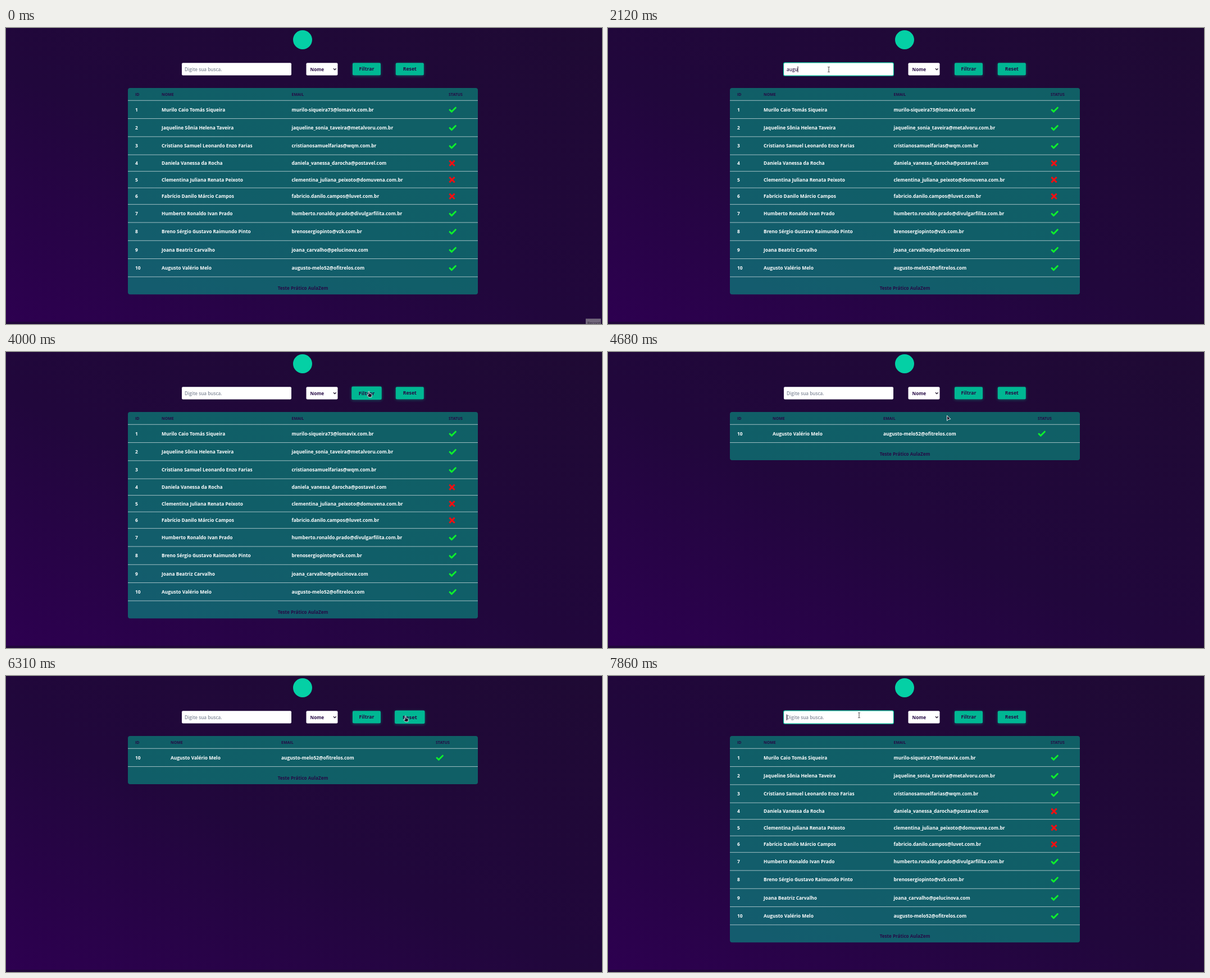
An HTML page that plays this animation: 1061 by 528 pixels, repeating every 8 s.

```html
<!DOCTYPE html>
<html lang="pt-BR">
<head>
<meta charset="utf-8">
<title>Teste Prático</title>
<style>
  html, body { margin: 0; width: 100%; height: 100%; overflow: hidden; background: #20083a; }
  svg {
    display: block; width: 1061px; height: 528px;
    background: linear-gradient(24deg, #2d0050 0%, #21073c 45%, #1f0a34 100%) 0 0 / 100% 524px;
    font: 700 8.4px "Open Sans", "Noto Sans", sans-serif;
  }
  text { white-space: pre; }
  .panel { fill: rgba(0, 181, 148, .5); }
  .line { fill: #fff; opacity: .6; }
  .cell { fill: #fff; }
  .head { fill: #260a45; font-size: 7px; }
  .foot { fill: #260a45; font-size: 8.1px; text-anchor: middle; }
  .yes, .no { fill: none; stroke: #0df22c; stroke-width: 2.9; stroke-linejoin: round; stroke-linecap: round; }
  .no { stroke: #f30f12; stroke-width: 3.1; stroke-linecap: square; }
  .btn rect { fill: #00b793; filter: drop-shadow(0 1.5px 2.5px rgba(0, 183, 147, .45)); }
  .btn text { fill: #260a45; font-size: 8.7px; text-anchor: middle; }
  .field { font-size: 8.2px; font-weight: 600; }
</style>
</head>
<body>
<svg viewBox="0 0 1061 528">
  <circle cx="528" cy="21" r="17" fill="#04d0a5"/>

  <rect x="313" y="62.3" width="195" height="22.2" rx="2" fill="#fff"/>
  <rect id="ring" x="312.5" y="61.8" width="196" height="23.4" rx="2.5" fill="#fff" stroke="#00b793" stroke-width="1.2"/>
  <text id="hint" class="field" x="318" y="77" fill="#828a99">Digite sua busca.</text>
  <text id="typed" class="field" x="318" y="77" fill="#3a2552"></text>
  <rect id="caret" y="68.5" width="1" height="10.5" fill="#1c1028"/>

  <rect x="534.5" y="62.3" width="56" height="22.2" rx="2" fill="#fff"/>
  <text x="541.5" y="77" font-size="8.2" fill="#260a45">Nome</text>
  <path d="M583 72.2l2.3 2.4 2.3-2.4" fill="none" stroke="#1c1028" stroke-width="1.3"/>

  <g id="filter" class="btn">
    <rect x="-25" y="-11" width="50" height="22" rx="2"/><text y="3">Filtrar</text>
  </g>
  <g id="reset" class="btn">
    <rect x="-25" y="-11" width="50" height="22" rx="2"/><text y="3">Reset</text>
  </g>

  <g id="full"></g>
  <g id="found"></g>

  <g id="tip">
    <rect x="1032" y="518.5" width="27" height="10" fill="#72687c"/>
    <text x="1035" y="528.5" font-size="7" font-weight="400" fill="#2b2433">Record</text>
  </g>

  <g id="cursor">
    <path id="arrow" d="M.5.5V9.8L2.9 7.5 6.7 6.8Z" fill="#1a1028" stroke="#fff" stroke-width=".9" stroke-linejoin="round"/>
    <path id="hand" d="M-.9.6Q0-.5.9.6V4L4.6 4.9Q5.4 5.2 5.3 6.2L4.7 10.6H-.3L-3 7Q-3.1 5.8-2 6L-.9 7Z"
      fill="#1a1028" stroke="#fff" stroke-width=".8" stroke-linejoin="round"/>
    <path id="beam" d="M-1.8-4.5H-.5L0-4 .5-4.5H1.8M0-4V4M-1.8 4.5H-.5L0 4 .5 4.5H1.8" fill="none" stroke="#333" stroke-width=".9"/>
  </g>
</svg>

<script>
const LOOP = 8000;
const el = id => document.getElementById(id);

const people = [
  ["Murilo Caio Tomás Siqueira", "murilo-siqueira73@lomavix.com.br", 1],
  ["Jaqueline Sônia Helena Taveira", "jaqueline_sonia_taveira@metalvoru.com.br", 1],
  ["Cristiano Samuel Leonardo Enzo Farias", "cristianosamuelfarias@wqm.com.br", 1],
  ["Daniela Vanessa da Rocha", "daniela_vanessa_darocha@postavel.com", 0],
  ["Clementina Juliana Renata Peixoto", "clementina_juliana_peixoto@domuvena.com.br", 0],
  ["Fabrício Danilo Márcio Campos", "fabricio.danilo.campos@luvet.com.br", 0],
  ["Humberto Ronaldo Ivan Prado", "humberto.ronaldo.prado@divulgarfilita.com.br", 1],
  ["Breno Sérgio Gustavo Raimundo Pinto", "brenosergiopinto@vzk.com.br", 1],
  ["Joana Beatriz Carvalho", "joana_carvalho@pelucinova.com", 1],
  ["Augusto Valério Melo", "augusto-melo52@ofitrelos.com", 1]
].map(([name, mail, ok], i) => ({ id: i + 1, name, mail, ok }));

function table(rows, cols) {
  const text = (cls, x, y, s) => `<text class="${cls}" x="${x}" y="${y}">${s}</text>`;
  const line = y => `<rect class="line" x="217" y="${y - .25}" width="623" height="1"/>`;
  let y = 129;
  let out = ["ID", "NOME", "EMAIL", "STATUS"].map((s, i) => text("head", cols[i], 120.7, s)).join("") + line(y);
  for (const p of rows) {
    const h = p.ok ? 32.3 : 29.5, mid = y + h / 2 + .6;
    out += [p.id, p.name, p.mail].map((s, i) => text("cell", cols[i], mid + 3, s)).join("");
    out += `<path class="${p.ok ? "yes" : "no"}" transform="translate(${cols[3]} ${mid})" d="${
      p.ok ? "M2 .2L5.3 3.6 12.4-3.6" : "M2.5-3.5L9.5 3.5M9.5-3.5L2.5 3.5"}"/>`;
    y += h;
    out += line(y);
  }
  const panel = `<rect class="panel" x="217" y="107" width="623" height="${y + 31.6 - 107}" rx="4"/>`;
  return panel + out + text("foot", 528.5, y + 23.6, "Teste Prático AulaZem");
}
el("full").innerHTML = table(people, [230, 277, 508.5, 788]);
el("found").innerHTML = table(people.slice(-1), [230, 293, 490, 765]);

// start, end, then start point, control point and end point
const trips = [
  [230, 950, 1010, 508, 690, 270, 393, 74],
  [3120, 3640, 393, 74, 520, 77, 646, 70],
  [4150, 4800, 646, 70, 622, 93, 599, 117],
  [4820, 5600, 599, 117, 590, 136, 573, 152],
  [5650, 6280, 573, 152, 645, 118, 711, 71],
  [6570, 7030, 711, 71, 640, 104, 534, 80],
  [7130, 7370, 534, 80, 500, 78, 463, 74],
  [7390, 7640, 463, 74, 454, 71, 447, 70]
];
const keys = [1400, 1610, 1760, 2120, 2270, 2450, 2600];
const word = "augusto";

const clamp = v => Math.min(1, Math.max(0, v));
const smooth = v => v * v * (3 - 2 * v);
const ramp = (t, from, ms = 150) => smooth(clamp((t - from) / ms));
const pulse = (t, from, to) => ramp(t, from) - ramp(t, to);
const show = (id, on) => el(id).style.opacity = +on;

function pointer(t) {
  const trip = trips.filter(p => t >= p[0]).pop() || trips[0];
  const [a, b, x0, y0, cx, cy, x1, y1] = trip;
  const e = smooth(clamp((t - a) / (b - a))), f = 1 - e;
  const mix = (p, q, r) => f * f * p + 2 * f * e * q + e * e * r;
  return [mix(x0, cx, x1), mix(y0, cy, y1)];
}

function button(id, x, hover) {
  el(id).setAttribute("transform", `translate(${x} 73.3) scale(${1 + .07 * hover})`);
}

function draw(t) {
  show("tip", t < 20 ? 1 : t < 60 ? .5 : 0);

  const filtered = t >= 4080 && t < 6340;
  show("full", !filtered);
  show("found", filtered);

  const s = t < 3900 ? word.slice(0, keys.filter(k => t >= k).length) : "";
  el("typed").textContent = s;
  show("hint", !s);
  show("ring", pulse(t, 1050, 3740) + ramp(t, 7640));
  show("caret", t >= 1060 && t < 3740 || t >= 7640);
  el("caret").setAttribute("x", 317.8 + (s ? el("typed").getComputedTextLength() : 0));

  button("filter", 642, pulse(t, 3525, 4400));
  button("reset", 718.8, pulse(t, 6130, 6675));

  const [x, y] = pointer(t);
  const inRow = y > 61 && y < 85.2;
  const kind = inRow && x > 312 && x < 509 ? "beam"
    : inRow && (x > 616 && x < 668 || x > 693 && x < 745) ? "hand" : "arrow";
  for (const k of ["arrow", "hand", "beam"]) show(k, k === kind);
  show("cursor", t >= 230);
  el("cursor").setAttribute("transform", `translate(${x} ${y})`);
}

const begin = performance.now();
function tick() {
  draw((performance.now() - begin) % LOOP);
  requestAnimationFrame(tick);
}
tick();
</script>
</body>
</html>
```
